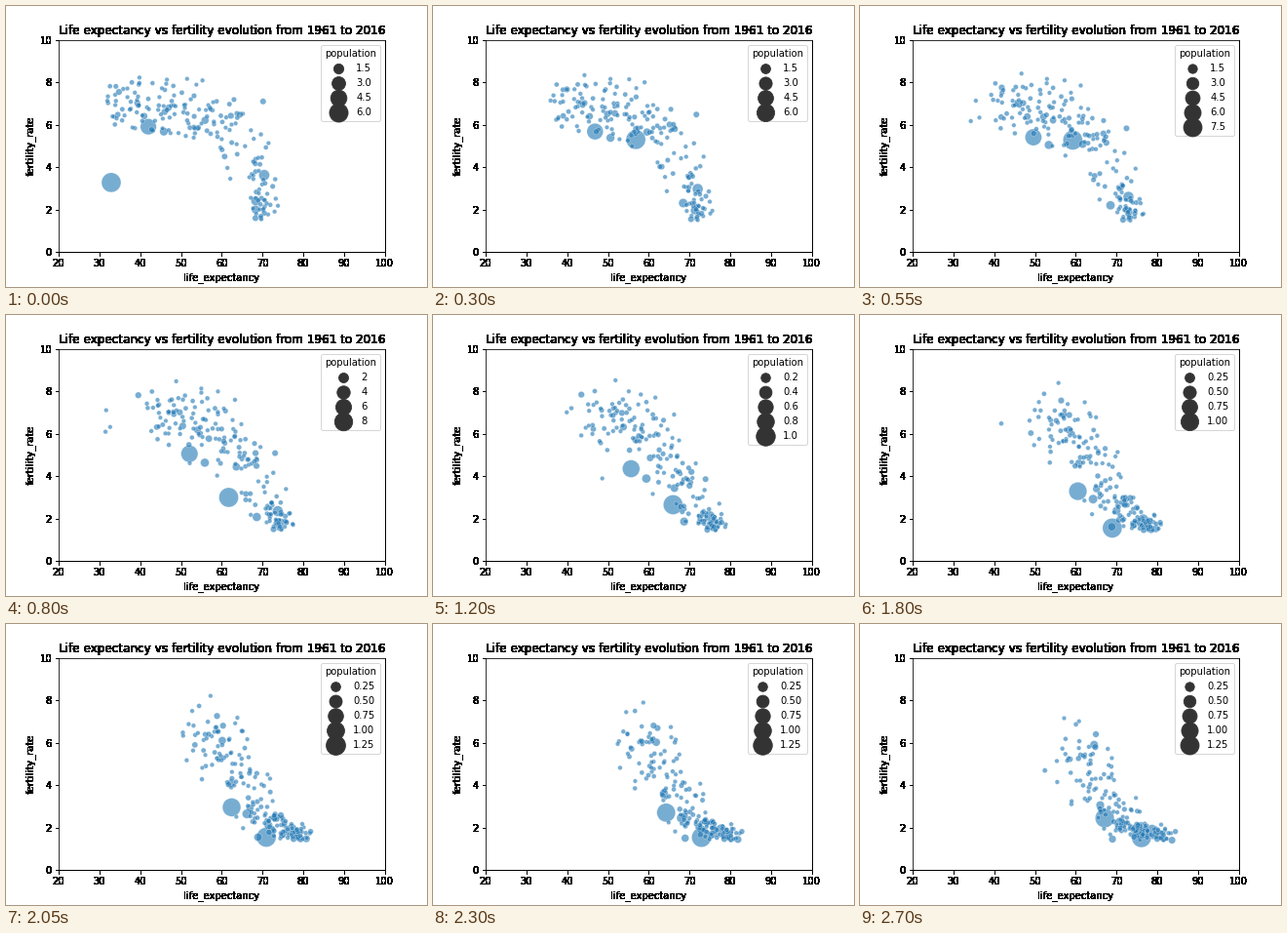
These frames come from a looping animation (432x288 px, 2750 ms). A matplotlib script:

```python
import numpy as np
import matplotlib.pyplot as plt
from matplotlib.animation import FuncAnimation
from matplotlib.ticker import MaxNLocator, ScalarFormatter

N_YEARS = 55
N_CROWD = 182
OVERPRINTS = 55
t = np.linspace(0, 1, N_YEARS)
rng = np.random.default_rng(7)


def logistic(x):
    return 1 / (1 + np.exp(-x))


def gain(start, end):
    """Life expectancy: fast at first, then slowing."""
    return start + (end - start) * t ** 0.75


def decline(start, end, mid):
    """Fertility: an S-curve that passes exactly through both ends."""
    s = logistic((t - mid) / 0.2)
    return start + (end - start) * (s - s[0]) / (s[-1] - s[0])


def drift(n):
    """Standard-normal offsets that wander slowly over time."""
    a, b = np.clip(rng.normal(size=(2, n, 1)), -1.9, 1.9)
    return a * np.cos(0.9 * t) + b * np.sin(0.9 * t)


def crowd(n):
    """Countries ranked from late (0) to completed (1) transition."""
    q = np.linspace(0, 1, n)[:, None]
    first = 34.5 + 36 * np.minimum(1.25 * q, 1) ** 1.15
    last = 57 + 25 * q ** 0.7
    life = gain(first, last) + (3.2 - 1.4 * q) * drift(n)

    # Some late countries go through a crisis
    depth = rng.uniform(4, 12, (n, 1)) * (rng.random((n, 1)) < 0.2) * (q < 0.4)
    when = rng.uniform(0.2, 1, (n, 1))
    life -= depth * np.exp(-((t - when) / 0.12) ** 2)

    mid = 1.2 - q - 0.9 * q ** 3 + 0.15 * drift(n)
    fert = 1.7 + 5.1 * logistic((mid - t) / 0.2)
    fert *= np.exp(0.1 * drift(n))
    pop = np.minimum(0.006 * np.exp(1.2 * rng.normal(size=(n, 1))), 0.06)
    return life, fert, pop + 0 * t


def giant(life, fert, mid, pop):
    """A populous country, each pair giving its first and last value."""
    return gain(*life), decline(*fert, mid), np.linspace(*pop, N_YEARS)


# The largest country recovers from a famine, so it needs its own key points
largest = (
    np.interp(t, [0, .02, .11, .3, .44, .67, 1], [32.9, 47, 56.8, 61.8, 65.9, 69, 76.1]),
    np.interp(t, [0, .04, .11, .17, .3, .5, .63, 1],
              [3.27, 7.4, 5.28, 6.1, 2.9, 2.55, 1.55, 1.52]),
    np.ones(N_YEARS),
)
giants = [
    largest,
    giant((42, 67.1), (5.9, 2.44), 0.47, (0.66, 0.95)),
    giant((70.4, 78.7), (3.62, 1.9), -0.3, (0.27, 0.22)),
    giant((45.8, 70.8), (5.67, 2.25), 0.40, (0.14, 0.19)),
    giant((68.3, 83.6), (2.0, 1.4), 0.40, (0.14, 0.09)),
    giant((68.3, 69.0), (2.4, 1.45), 0.35, (0.18, 0.10)),
    giant((55.9, 75.0), (6.2, 1.75), 0.30, (0.11, 0.15)),
    giant((41, 64.5), (6.4, 5.9), 0.80, (0.07, 0.13)),
    giant((46, 66.0), (6.6, 3.05), 0.68, (0.07, 0.14)),
    giant((47, 71.5), (6.8, 2.15), 0.50, (0.07, 0.11)),
]
life, fert, share = (np.vstack(parts) for parts in zip(*giants, crowd(N_CROWD)))
top_pop = 1e8 * np.interp(t, [0, .11, .3, .67, 1], [6.6, 7.4, 9.45, 12.3, 13.9])


def area(fraction):
    return 20 + 380 * fraction


fig, ax = plt.subplots(figsize=(6, 4), dpi=72, facecolor="white")
fig.subplots_adjust(left=0.125, right=0.9, bottom=0.125, top=0.88)
ax.set(xlim=(20, 100), ylim=(0, 10),
       xlabel="life_expectancy", ylabel="fertility_rate",
       title="Life expectancy vs fertility evolution from 1961 to 2016")

# Printing the empty chart many times over darkens its soft edges
fig.canvas.draw()
blank = np.asarray(fig.canvas.buffer_rgba())[..., :3] / 255
fig.figimage(blank ** OVERPRINTS, zorder=-1)

dots = ax.scatter(life[:, 0], fert[:, 0], s=area(share[:, 0]), color="C0",
                  edgecolor="white", linewidth=0.4, alpha=0.6)


def draw_legend(top):
    levels = [v for v in MaxNLocator(nbins=6).tick_values(0, top) if 0 < v <= top]
    fmt = ScalarFormatter()
    fmt.create_dummy_axis()
    fmt.axis.set_view_interval(0, top)
    fmt.set_locs(levels)
    handles = [ax.scatter([], [], s=area(v / top), color=".2", linewidth=0.8)
               for v in levels]
    ax.legend(handles, [fmt(v) for v in levels], title="population",
              loc="upper right")
    for handle in handles:
        handle.remove()


def update(year):
    dots.set_offsets(np.column_stack([life[:, year], fert[:, year]]))
    dots.set_sizes(area(share[:, year]))
    draw_legend(top_pop[year])
    return [dots]


anim = FuncAnimation(fig, update, frames=N_YEARS, interval=50, repeat=True)
plt.show()
```
